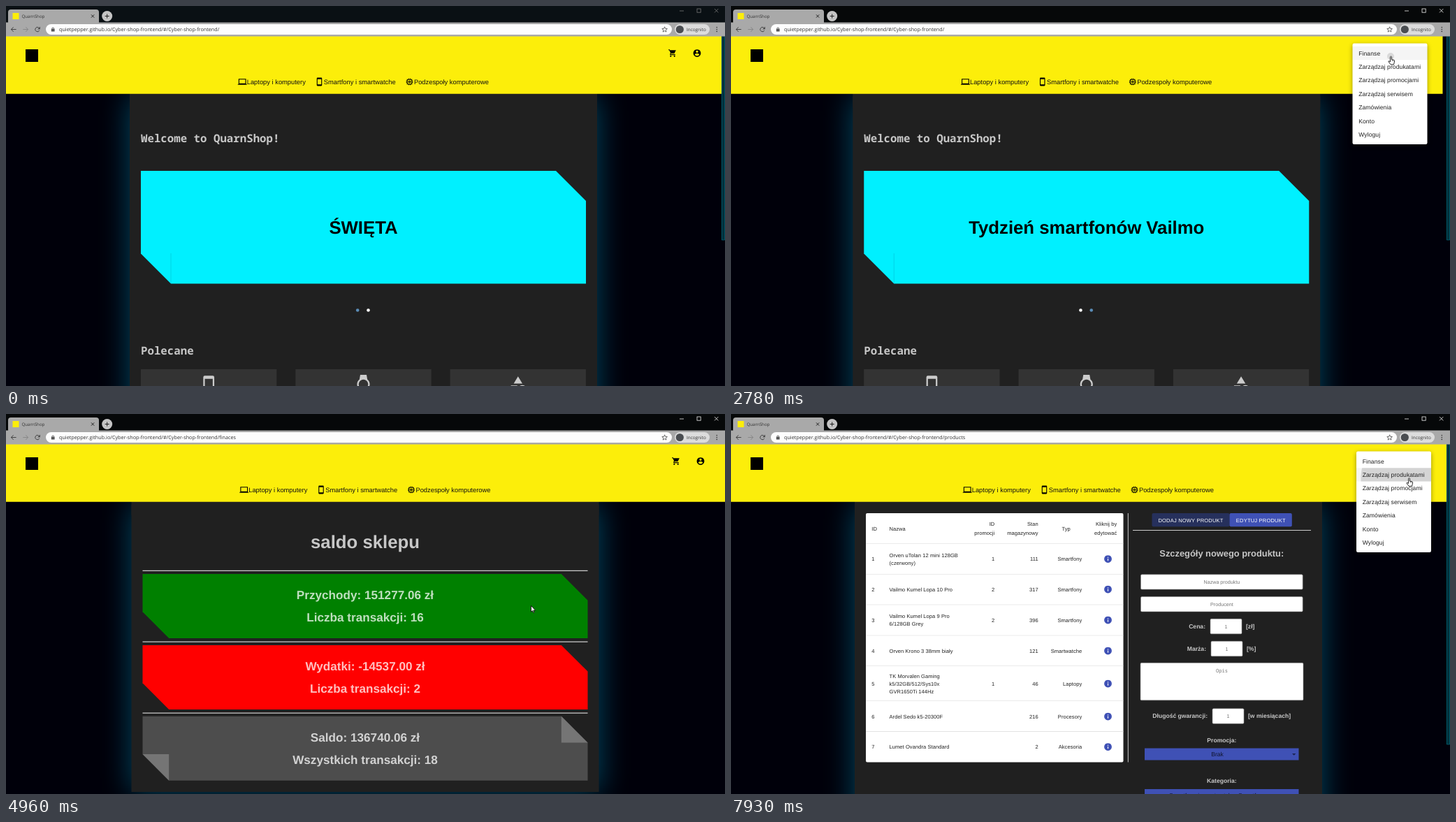
These frames come from a looping animation (1029x544 px, 8 s). An HTML page with a canvas:

```html
<!DOCTYPE html>
<html lang="pl">
<head>
<meta charset="utf-8">
<title>QuarnShop</title>
<style>
html, body { margin: 0; width: 100%; height: 100%; overflow: hidden; background: #00000a; }
canvas { display: block; }
</style>
</head>
<body>
<canvas id="stage" width="1029" height="544"></canvas>
<script>
const LOOP = 8000;
const SANS = '"Liberation Sans", Arial, sans-serif';
const UI = '"Open Sans", "Noto Sans", sans-serif';
const MONO = '"Noto Sans Mono", "DejaVu Sans Mono", monospace';
const SOFT = 'rgba(255,255,255,.75)', BLUE = '#3f51b5', DARK = '#202020';

// Moments of the story, in ms
const T = {
  slide: 180, press1: 1450, open1: 1554, press2: 2690, finance: 2840, data: 3000,
  close: 4500, closed: 4802, press3: 6140, open2: 6245, press4: 7600, products: 7750
};
const MENU = ['Finanse', 'Zarządzaj produkatami', 'Zarządzaj promocjami', 'Zarządzaj serwisem',
  'Zamówienia', 'Konto', 'Wyloguj'];
const MENU_W = 107, MENU_TOP = 53.5, ROW_TOP = 57.8, ROW_H = 19.4;

const ICON = {
  laptop: 'M2 4h20v14h2v2H0v-2h2zM4 6v10h16V6z',
  phone: 'M7 1h10a2 2 0 0 1 2 2v18a2 2 0 0 1-2 2H7a2 2 0 0 1-2-2V3a2 2 0 0 1 2-2zM7 5v14h10V5z',
  chip: 'M9 9h6v6H9zM11 11v2h2v-2zM5 5h14v14H5zM7 7v10h10V7z',
  cart: 'M1 2h3.3l.9 2H21l-4.5 9H8l-1 2h12v2H5.5l-.6-2.5 1.7-2.9L3 4H1zM7 18a2 2 0 1 0 .01 0zM17 18a2 2 0 1 0 .01 0z',
  user: 'M12 2a10 10 0 1 0 .01 0zM12 5a3 3 0 1 0 .01 0zM6 16c0-4 12-4 12 0a7.2 7.2 0 0 1-12 0z',
  info: 'M12 2a10 10 0 1 0 .01 0zM11 7h2v2h-2zM11 11h2v6h-2z',
  watch: 'M8 0h8l1 5.7a8 8 0 0 1 0 12.6L16 24H8l-1-5.7a8 8 0 0 1 0-12.6zM12 6a6 6 0 1 0 .01 0z',
  shapes: 'M12 2l5.5 9h-11zM17.5 13a4.5 4.5 0 1 0 .01 0zM3 13.5h8v8H3z'
};
for (const a of [9, 13]) {
  for (const b of [3, 19]) ICON.chip += `M${a} ${b}h2v2h-2zM${b} ${a}h2v2h-2z`;
}
for (const k in ICON) ICON[k] = new Path2D(ICON[k]);
const ARROW = new Path2D('M0 0v9l2-1.9 1.4 3.1 1.3-.6-1.4-2.9h2.8z');
const HAND = new Path2D('M-.9.7q.9-1.2 1.8 0v3.9l3 .6q1.3.3 1.2 1.6l-.6 3-.5 2h-4.4l-3-4q-.4-1.2.8-1l1.7 1.1z');

// Pointer path: time, x, y
const PATH = [
  [70, 1003, 472], [820, 956, 65], [920, 956, 65], [1280, 982.5, 71], [1450, 982.5, 71],
  [1600, 981.5, 70.5], [1790, 981.5, 70.5], [2150, 944.5, 72], [3420, 944.5, 72], [3720, 752, 250],
  [4060, 752, 250], [4180, 743, 267], [4800, 743, 267], [5190, 766, 287], [5500, 766, 287],
  [6080, 993, 73], [6400, 993, 73], [6840, 970.5, 91.5]
];

const PRODUCTS = [
  [207.5, 'Orven uTolan 12 mini 128GB|(czerwony)', '1', '111', 'Smartfony'],
  [251, 'Vailmo Kumel Lopa 10 Pro', '2', '317', 'Smartfony'],
  [295, 'Vailmo Kumel Lopa 9 Pro|6/128GB Grey', '2', '396', 'Smartfony'],
  [339, 'Orven Krono 3 38mm biały', '', '121', 'Smartwatche'],
  [386, 'TK Morvalen Gaming|k5/32GB/512/Sys10x|GVR1650Ti 144Hz', '1', '46', 'Laptopy'],
  [433, 'Ardel Sedo k5-20300F', '', '216', 'Procesory'],
  [476.5, 'Lumet Ovandra Standard', '', '2', 'Akcesoria']
];

const stage = document.getElementById('stage').getContext('2d');
const layer = document.createElement('canvas');
layer.width = 1029;
layer.height = 544;
const menuCtx = layer.getContext('2d');
for (const c of [stage, menuCtx]) {
  c.textRendering = 'geometricPrecision';
  c.textBaseline = 'alphabetic';
}
let g = stage;

const clamp = v => Math.max(0, Math.min(1, v));
const mix = (a, b, k) => a + (b - a) * k;

// cubic-bezier(.4, 0, .2, 1)
function ease(x) {
  x = clamp(x);
  let lo = 0, hi = 1, s = 0.5;
  for (let i = 0; i < 20; i++) {
    s = (lo + hi) / 2;
    const v = 1.2 * s * (1 - s) ** 2 + 0.6 * s * s * (1 - s) + s ** 3;
    if (v < x) lo = s; else hi = s;
  }
  return s * s * (3 - 2 * s);
}

function rect(x, y, w, h, fill, r = 0) {
  g.fillStyle = fill;
  g.beginPath();
  g.roundRect(x, y, w, h, r);
  g.fill();
}

function disc(x, y, r, fill) {
  g.fillStyle = fill;
  g.beginPath();
  g.arc(x, y, r, 0, 7);
  g.fill();
}

function poly(fill, ...pts) {
  g.fillStyle = fill;
  g.beginPath();
  for (const [x, y] of pts) g.lineTo(x, y);
  g.fill();
}

function line(color, width, ...pts) {
  g.strokeStyle = color;
  g.lineWidth = width;
  g.beginPath();
  for (const [x, y] of pts) g.lineTo(x, y);
  g.stroke();
}

// y is the middle of the capitals
function text(s, x, y, size, fill, { align = 'left', bold = false, font = SANS, gap = 0 } = {}) {
  g.font = `${bold ? 'bold ' : ''}${size}px ${font}`;
  g.letterSpacing = gap + 'px';
  g.textAlign = align;
  g.fillStyle = fill;
  g.fillText(s, x, y + size * 0.358);
}

function icon(name, x, y, size, fill) {
  g.save();
  g.translate(x - size / 2, y - size / 2);
  g.scale(size / 24, size / 24);
  g.fillStyle = fill;
  g.fill(ICON[name], 'evenodd');
  g.restore();
}

function shadow(color, blur, dy = 0) {
  g.shadowColor = color;
  g.shadowBlur = blur;
  g.shadowOffsetY = dy;
}
const noShadow = () => shadow('transparent', 0);

// Rectangle with the top right and bottom left corners cut off
function cutBox(x, y, w, h, c, fill) {
  poly(fill, [x, y], [x + w - c, y], [x + w, y + c], [x + w, y + h], [x + c, y + h], [x, y + h - c]);
}

function pageWidth(t) {
  if (t < T.open1) return 1024;
  if (t < T.finance) return 1018.5;
  if (t < T.closed) return 1024;
  return t < T.products ? 1029 : 1024;
}

function pointer(t) {
  if (t < PATH[0][0]) return null;
  const i = PATH.findIndex(p => p[0] > t);
  if (i < 0) return PATH[PATH.length - 1].slice(1);
  const [t0, x0, y0] = PATH[i - 1], [t1, x1, y1] = PATH[i];
  let k = (t - t0) / (t1 - t0);
  k = k * k * (3 - 2 * k);
  return [mix(x0, x1, k), mix(y0, y1, k)];
}

function menuState(t) {
  if (t < T.open1 || (t >= T.closed && t < T.open2)) return null;
  if (t >= T.close && t < T.closed) {
    const k = t - T.close;
    return { alpha: 1 - ease(k / 302), grow: 1 - ease((k - 101) / 201), live: false };
  }
  const k = t - (t < T.close ? T.open1 : T.open2);
  return { alpha: ease(k / 302), grow: ease(k / 201), live: true };
}

function ripple(t, start, x, y, r, release = 150) {
  const k = t - start;
  if (k < 0 || k > release + 550) return;
  const e = ease(k / 550), fade = 1 - ease((k - release) / 550);
  disc(x, y, r * e, `rgba(0,0,0,${mix(0.1, 0.27, e) * fade})`);
}

function drawCard(cx, bottom) {
  shadow('rgba(0,200,255,.36)', 40);
  rect(cx - 334.5, 130, 669, bottom - 130, DARK);
  noShadow();
  rect(cx - 334.5, 125, 669, 20, DARK);
}

function drawHome(cx, t) {
  const L = cx - 318.5, mono = { bold: true, font: MONO };
  text('Welcome to QuarnShop!', L, 189.3, 15.75, SOFT, mono);
  cutBox(L, 236, 637, 161.5, 43, '#00f0ff');
  line('rgba(0,60,80,.25)', 0.6, [L + 43, 354], [L + 43, 397]);

  const k = ease((t - T.slide) / 500);
  const banner = { bold: true, align: 'center' };
  text('ŚWIĘTA', cx, 316.8, 25.75, `rgba(0,0,0,${1 - k})`, banner);
  text('Tydzień smartfonów Vailmo', cx, 316.8, 25.75, `rgba(0,0,0,${k})`, banner);
  const dot = v => `rgb(${mix(255, 91, v)},${mix(255, 141, v)},${mix(255, 184, v)})`;
  disc(cx - 8.3, 435.5, 2.3, dot(1 - k));
  disc(cx + 7, 435.5, 2.3, dot(k));

  text('Polecane', L, 493.3, 15.75, SOFT, mono);
  ['phone', 'watch', 'shapes'].forEach((name, i) => {
    const x = L + i * 221.3;
    rect(x, 520, 194.3, 30, '#333');
    icon(name, x + 97.2, 541.5, 27, '#ccc');
  });
}

function drawFinance(cx, t) {
  const L = cx - 318.5, mid = { bold: true, align: 'center' };
  const ready = t >= T.data;
  const pick = (a, b) => ready ? a : b;
  text('saldo sklepu', cx, 183, 25.75, SOFT, mid);
  const boxes = [
    ['#008000', `Przychody: ${pick('151277.06 ', '')}zł`, `Liczba transakcji:${pick(' 16', '')}`],
    ['#f00', `Wydatki: ${pick('-14537.00 ', '')}zł`, `Liczba transakcji:${pick(' 2', '')}`],
    ['#4d4d4d', `Saldo: ${pick('136740.06', 'NaN')} zł`, `Wszystkich transakcji: ${pick('18', 'NaN')}`]
  ];
  boxes.forEach(([fill, a, b], i) => {
    const y = 229 + i * 101.9;
    line('#ccc', 1.2, [L, y - 4.7], [L + 637, y - 4.7]);
    cutBox(L, y, 637, 92, 37.7, fill);
    if (i === 2) {
      poly('#757575', [L + 599.3, y], [L + 637, y + 37.7], [L + 599.3, y + 37.7]);
      poly('#757575', [L, y + 54.3], [L + 37.7, y + 54.3], [L + 37.7, y + 92]);
    }
    text(a, cx, y + 30, 17.15, SOFT, mid);
    text(b, cx, y + 61.8, 17.15, SOFT, mid);
  });
}

function drawTable() {
  const cell = (s, x, y, align) => {
    const lines = s.split('|'), step = lines[0] === 'ID' || align === 'head' ? 13 : 10.9;
    lines.forEach((l, i) => text(l, x, y + (i - (lines.length - 1) / 2) * step, 7.5, '#222',
      { align: align === 'head' ? 'right' : align, gap: 0.08 }));
  };
  rect(193, 142, 368.5, 356.5, '#fff', 2);
  cell('ID', 201.3, 164);
  cell('Nazwa', 226.5, 164);
  cell('ID|promocji', 377.3, 163.8, 'head');
  cell('Stan|magazynowy', 439.7, 163.8, 'head');
  cell('Typ', 479.7, 164, 'center');
  cell('Kliknij by|edytować', 552.3, 163.8, 'head');
  for (const y of [185.5, 229.5, 273, 317, 360.7, 410.7, 454.6]) rect(193, y - 0.3, 368.5, 0.6, '#d8d8d8');
  PRODUCTS.forEach(([y, name, promo, stock, type], i) => {
    cell(String(i + 1), 201.3, y);
    cell(name, 226.5, y);
    cell(promo, 377.3, y, 'right');
    cell(stock, 439.7, y, 'right');
    cell(type, 502.3, y, 'right');
    icon('info', 539.5, y, 12.9, BLUE);
  });
}

function drawForm() {
  const mid = { align: 'center' }, hint = '#757575';
  const label = (s, x, y, align) => text(s, x, y, 8.58, SOFT, { bold: true, align });
  const field = (x, y, w, h, s, font = SANS) => {
    rect(x, y, w, h, '#fff', 1.5);
    g.strokeStyle = '#8a8a8a';
    g.lineWidth = 0.6;
    g.stroke();
    text(s, x + w / 2, y + Math.min(h / 2, 10.8), 7.15, hint, { align: 'center', font });
  };
  const number = (name, x, y, unit) => {
    label(name, x - 7, y, 'right');
    field(x, y - 10.5, 45, 21.5, '1');
    label(unit, x + 51, y, 'left');
  };
  const select = (s, y) => {
    rect(592, y, 220.5, 17, BLUE);
    text(s, 696, y + 8.6, 8.58, '#10142e', mid);
  };

  line('#ccc', 1, [568.3, 142], [568.3, 498.5]);
  rect(602.5, 142, 111, 19.3, '#26305c', 2);
  rect(713.5, 142, 89.3, 19.3, BLUE, 2);
  text('DODAJ NOWY PRODUKT', 658, 152, 7.5, '#fff', { align: 'center', gap: 0.21 });
  text('EDYTUJ PRODUKT', 758.3, 152, 7.5, '#fff', { align: 'center', gap: 0.21 });
  line('#ccc', 1.2, [575, 166.5], [830, 166.5]);
  text('Szczegóły nowego produktu:', 702.3, 199.2, 12.87, SOFT, { align: 'center', bold: true });
  field(586.5, 229.8, 231.7, 21.3, 'Nazwa produktu');
  field(586.5, 261.6, 231.7, 21.3, 'Producent');
  number('Cena:', 686, 303.8, '[zł]');
  number('Marża:', 687, 335.8, '[%]');
  field(586, 356.3, 233, 53.5, 'Opis', MONO);
  number('Długość gwarancji:', 689, 432.3, '[w miesiącach]');
  label('Promocja:', 702.3, 467.3, 'center');
  select('Brak', 478.5);
  poly('#1b2350', [803, 486], [808.4, 486], [805.7, 488.8]);
  label('Kategoria:', 702.3, 525.3, 'center');
  select('Smartfony i smartwatche, Smartfony', 537);
}

function drawHeader(W, cx, t, at, menu) {
  rect(0, 43, W, 82.8, '#fcee0a');
  rect(28, 62, 18, 18, '#000');
  const nav = [
    ['laptop', -173.3, 'Laptopy i komputery', -166.8],
    ['phone', -63, 'Smartfony i smartwatche', -56.7],
    ['chip', 66, 'Podzespoły komputerowe', 72.4]
  ];
  for (const [name, ix, s, tx] of nav) {
    icon(name, cx + ix, 108.5, 12.9, '#000');
    text(s, cx + tx, 108.8, 9.35, '#111');
  }
  const user = W - 35;
  for (const x of [W - 70, user]) {
    if (at && !menu && Math.hypot(at[0] - x, at[1] - 67.5) < 13) disc(x, 67.5, 12.9, 'rgba(0,0,0,.04)');
  }
  ripple(t, T.press1, user, 67.5, 12.9, 104);
  ripple(t, T.press3, user, 67.5, 12.9, 104);
  icon('cart', W - 70, 67.5, 12.9, '#000');
  icon('user', user, 67.5, 12.9, '#000');
}

function drawScrollbar(t) {
  const end = t < T.finance ? 335 : t >= T.products ? 473 : 0;
  if (!end) return;
  rect(1024, 43, 5, 501, '#00000a');
  rect(1024, 43, 5, end - 43, '#01303b');
  line('#01697a', 0.7, [1024.4, 44], [1024.4, end], [1028.6, end], [1028.6, 44]);
}

function drawMenu(W, t, at, { alpha, grow, live }) {
  const left = W - 22 - MENU_W, h = 144.5;
  g = menuCtx;
  g.clearRect(0, 0, 1029, 544);
  shadow('rgba(0,0,0,.4)', 6, 2);
  rect(left, MENU_TOP, MENU_W, h, '#fff', 2.2);
  noShadow();
  if (live && at && at[0] > left && at[0] < left + MENU_W) {
    const row = Math.floor((at[1] - ROW_TOP) / ROW_H);
    if (row >= 0 && row < MENU.length) rect(left, ROW_TOP + row * ROW_H, MENU_W, ROW_H, 'rgba(0,0,0,.04)');
  }
  // Press positions are measured from the menu's left edge
  for (const [row, start, dx, y, r] of [[0, T.press2, 54.5, 72, 60], [1, T.press4, 70.5, 91.5, 73]]) {
    g.save();
    g.beginPath();
    g.rect(left, ROW_TOP + row * ROW_H, MENU_W, ROW_H);
    g.clip();
    ripple(t, start, left + dx, y, r);
    g.restore();
  }
  MENU.forEach((s, i) => text(s, left + 8.7, ROW_TOP + (i + 0.5) * ROW_H, 8.58, '#212121', { gap: 0.08 }));

  g = stage;
  const ox = left + 100, oy = MENU_TOP + 14;
  g.save();
  g.globalAlpha = alpha;
  g.translate(ox, oy);
  g.scale(mix(0.75, 1, grow), mix(0.5625, 1, grow));
  g.drawImage(layer, -ox, -oy);
  g.restore();
}

function drawBrowser(t) {
  const active = t >= T.press1;
  rect(0, 0, 1029, 24, active ? '#060809' : '#0a1014');
  rect(3, 5, 130, 22, '#a9a9a9', 4);
  rect(0, 23.5, 1029, 20, '#a9a9a9');
  rect(9.5, 10, 9, 9, '#fcee0a');
  text('QuarnShop', 22.5, 14.7, 6.15, '#333', { font: UI });
  line('#222', 1, [122, 12.4], [126.2, 16.6]);
  line('#222', 1, [126.2, 12.4], [122, 16.6]);
  disc(144.7, 14.5, 7.5, '#c4c4c4');
  line('#222', 1, [141.7, 14.5], [147.7, 14.5]);
  line('#222', 1, [144.7, 11.5], [144.7, 17.5]);

  const ctl = active ? '#eee' : '#777';
  line(ctl, 0.8, [964, 7], [970, 7]);
  g.strokeRect(989, 4, 5.2, 5.2);
  line(ctl, 0.8, [1014, 4], [1019.4, 9.4]);
  line(ctl, 0.8, [1019.4, 4], [1014, 9.4]);

  for (const [x, d, c] of [[11, -1, '#444'], [28, 1, '#888']]) {
    line(c, 1, [x - 3.6, 33.5], [x + 3.6, 33.5]);
    line(c, 1, [x + 0.4 * d, 30.2], [x + 3.6 * d, 33.5], [x + 0.4 * d, 36.8]);
  }
  g.strokeStyle = '#444';
  g.beginPath();
  g.arc(45, 33.5, 3.2, 0.5, 5.4);
  g.stroke();
  poly('#444', [48.8, 29.6], [48.8, 33.2], [45.2, 33.2]);

  rect(57, 26, 896, 15, '#fdfdfd', 7.5);
  rect(64.8, 32.6, 4.8, 3.9, '#555', 0.5);
  g.strokeStyle = '#555';
  g.lineWidth = 0.8;
  g.beginPath();
  g.arc(67.2, 32.4, 1.5, Math.PI, 0);
  g.stroke();
  const page = t < T.finance ? '' : t < T.products ? 'finaces' : 'products';
  text('quietpepper.github.io/Cyber-shop-frontend/#/Cyber-shop-frontend/' + page, 76, 33.8, 7.22, '#333', { font: UI });

  g.strokeStyle = '#444';
  g.lineWidth = 0.8;
  g.beginPath();
  for (let i = 0; i < 10; i++) {
    const a = i * Math.PI / 5 - Math.PI / 2, r = i % 2 ? 1.8 : 4;
    g.lineTo(942.6 + r * Math.cos(a), 33.8 + r * Math.sin(a));
  }
  g.closePath();
  g.stroke();
  rect(957, 26, 50, 15, '#dcdcdc', 7.5);
  disc(964.3, 33.5, 5.6, '#4a4d51');
  text('Incognito', 974, 33.8, 6.4, '#333', { font: UI });
  for (const y of [30.6, 33.5, 36.4]) disc(1017.3, y, 0.8, '#333');
}

function drawPointer([x, y], W, menu) {
  const onMenu = menu && menu.live && x > W - 129 && x < W - 22 && y > MENU_TOP && y < 198;
  const onIcon = !menu && [W - 70, W - 35].some(c => Math.hypot(x - c, y - 67.5) < 13);
  const shape = onMenu || onIcon ? HAND : ARROW;
  g.save();
  g.translate(x, y);
  g.lineWidth = 0.9;
  g.lineJoin = 'round';
  g.strokeStyle = '#111';
  g.fillStyle = '#fff';
  g.fill(shape);
  g.stroke(shape);
  if (shape === HAND) {
    line('#111', 0.5, [1.9, 5], [1.9, 7]);
    line('#111', 0.5, [3.5, 5.4], [3.5, 7.2]);
  }
  g.restore();
}

function draw(t) {
  const W = pageWidth(t), cx = W / 2 - 0.5;
  const at = pointer(t), menu = menuState(t);
  const finance = t >= T.finance && t < T.products;
  rect(0, 0, 1029, 544, '#00000a');
  drawCard(cx, finance ? 541 : 620);
  if (t < T.finance) drawHome(cx, t);
  else if (finance) drawFinance(cx, t);
  else {
    drawTable();
    drawForm();
  }
  drawHeader(W, cx, t, at, menu);
  drawScrollbar(t);
  if (menu) drawMenu(W, t, at, menu);
  drawBrowser(t);
  if (at) drawPointer(at, W, menu);
}

const start = performance.now();
function frame() {
  draw((performance.now() - start) % LOOP);
  requestAnimationFrame(frame);
}
frame();
</script>
</body>
</html>
```
